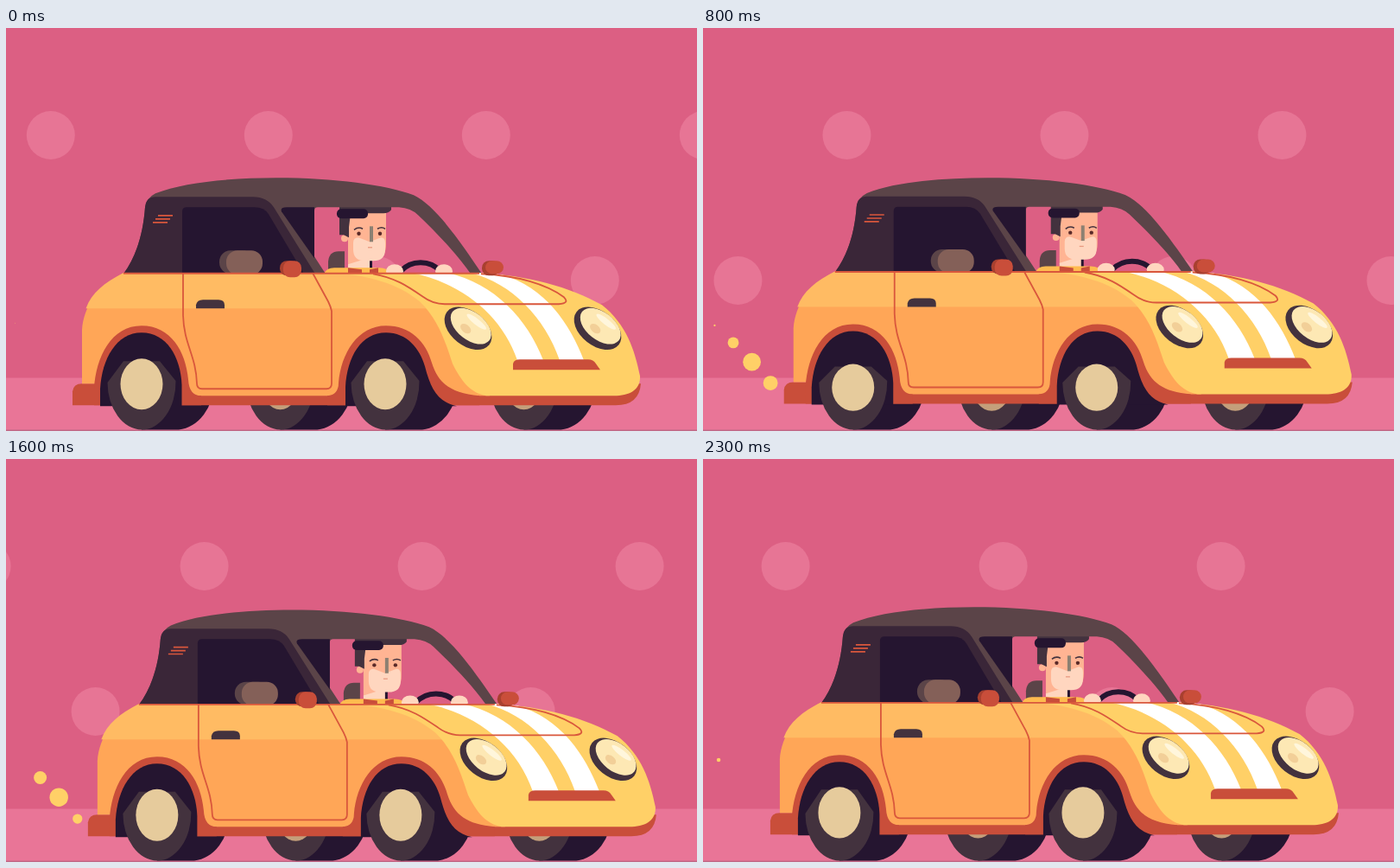
These frames come from a looping animation (800x466 px, 2.35 s). An HTML page:

```html
<!DOCTYPE html>
<html lang="en">
<head>
<meta charset="utf-8">
<title>Drive</title>
<style>
html, body { margin: 0; width: 100%; height: 100%; overflow: hidden; background: #dc5f83; }
svg { display: block; width: 100vw; height: 100vh; }
.red { fill: #c94e3a; }
.navy { fill: #251530; }
.plum { fill: #3a2638; }
.hair { fill: #43323e; }
.roof { fill: #5b4448; }
.skin { fill: #ffb493; }
.pale { fill: #ffd6bf; }
.seam { fill: none; stroke: #d9573c; stroke-width: 1.8; }
</style>
</head>
<body>
<svg viewBox="0 0 800 466">
  <rect width="800" height="466" fill="#dc5f83"/>
  <g id="dots" fill="#e77595"></g>
  <rect y="404.5" width="800" height="62" fill="#e97597"/>
  <rect y="464.5" width="800" height="2" fill="#c06886"/>
  <g id="puffs" fill="#ffd067"></g>

  <g id="car">
    <g id="far"></g>
    <g id="tires"></g>
    <g id="body">
      <g id="cabin">
        <!-- driver -->
        <path class="roof" d="M373 284V270Q374 258 385 258H392V284Z"/>
        <path class="skin" d="M396 210H440V250Q440 268 424 268L396 274Z"/>
        <path class="pale" d="M396 273L412 268H423V280H396Z"/>
        <path class="navy" d="M421 267H424V280H421Z"/>
        <path class="pale" d="M402 248Q402 242 408 242L421 247L434 242Q439 242 439 248V256Q439 269 425 269H416Q402 269 402 256Z"/>
        <circle class="skin" cx="392" cy="243" r="4"/>
        <path class="hair" d="M386 205H446V210Q443 214 437 214H399L397 230V242L391 239H386Z"/>
        <rect class="navy" x="383" y="209" width="36" height="11" rx="5"/>
        <path fill="#8c8072" d="M421 229H425V247H421Z"/>
        <path d="M403 233Q408 229 413 232M430 232Q435 229 439 232" fill="none" stroke="#43323e" stroke-width="1.6"/>
        <circle cx="408.500" cy="237.500" r="2.200" fill="#5a2a28"/>
        <circle cx="433" cy="237.500" r="2.200" fill="#5a2a28"/>
        <path d="M419 253.500H424" stroke="#e89a80" stroke-width="1.300"/>
        <path fill="#ffbb4f" d="M368 284Q371 277 380 277H432Q442 277 446 284Z"/>
        <path class="red" d="M396 277L412 279V284H396ZM421 279L431 277V284H421Z"/>
        <path d="M457 281Q466 271 480 271Q494 271 503 281" fill="none" stroke="#251530" stroke-width="6"/>
        <ellipse class="pale" cx="450" cy="281" rx="10" ry="8"/>
        <ellipse class="pale" cx="507" cy="281" rx="10" ry="8"/>
        <!-- roof with an open front window -->
        <path class="roof" fill-rule="evenodd" d="M136 284C152 262 159 235 161 207Q163 196 173 191C205 178 260 173 313 173C380 173 440 181 472 193C498 205 528 250 551 284Z
          M357 211Q357 207 361 207H455Q469 208 477 216C498 236 523 262 538 284H370L357 264Z"/>
        <path class="plum" d="M136 284C152 262 159 235 161 207Q162 195 173 195H286Q302 195 310 207L358 284Z"/>
        <path class="navy" d="M204 284V212Q204 207 209 207H288Q299 207 304 215L345 284Z"/>
        <path class="navy" d="M319 212Q317 207 325 207H357V266Z"/>
        <rect class="roof" x="247" y="257" width="40" height="27" rx="13"/>
        <rect x="255" y="257" width="42" height="28" rx="13" fill="#846058"/>
        <path d="M176 216.500H193M173 220.500H190M170 224.500H187" stroke="#d9573c" stroke-width="1.700"/>
      </g>

      <path class="red" d="M77 436V420Q78 411 88 411H735Q733 436 706 436Z"/>
      <path fill="#ffa657" d="M88 411V349C90 321 106 299 136 283H560V425H205L104 411Z"/>
      <path fill="#ffbb63" d="M92.500 324C99 306 114 294 136 283H500V324Z"/>
      <path fill="#ffd067" d="M376 283H548C605 286 652 299 690 320C718 342 728 372 734 402C735 418 722 425 704 425H556C538 422 527 408 517 388C509 364 501 337 479 316C454 295 418 285 376 283Z"/>
      <path fill="#fff" d="M470 283C526 294 574 331 592 384H622C604 337 566 295 511 283Z"/>
      <path fill="#fff" d="M538 283C586 295 624 335 641 384H669C653 342 624 299 574 285L550 283Z"/>
      <path class="seam" d="M136 283.500H548"/>
      <path class="seam" d="M425 284C450 288 466 299 482 310Q494 319 508 319H640Q653 318 646 311C626 296 592 286 550 284"/>
      <path class="seam" d="M205 283V332C206 366 220 378 221 411Q221 417 227 417H371Q377 417 377 411V327Q376 322 373 316L355 283"/>
      <path class="hair" d="M220 324V320Q221 314 228 314H246Q253 314 253 320V324Z"/>
      <path class="red" d="M587 395V388Q588 383 595 383H674Q680 383 683 388L688 395Z"/>

      <!-- wheel arches -->
      <path class="red" d="M102 436V417C104 380 122 344 157 344C191 344 208 374 211 406Q212 425 226 425V436Z"/>
      <path class="red" d="M372 436V425Q385 424 385 410C388 376 407 344 440 344C468 344 486 362 493 387C501 412 516 422 548 425V436Z"/>
      <path class="navy" d="M109 437V417C111 382 128 352 157 352C186 352 202 380 203.500 412V437Z"/>
      <path class="navy" d="M393 437V415C395 380 411 352 440 352C464 352 479 370 485 391C492 418 500 432 522 437Z"/>
      <g id="lamps"></g>
      <g id="mirrors"></g>
    </g>
    <g id="wheels"></g>
  </g>
</svg>
<script>
const LOOP = 2350, BUMPS = 6, TURN = 2 * Math.PI;
const $ = id => document.getElementById(id);

function set(el, attrs) {
  for (const k in attrs) el.setAttribute(k, attrs[k]);
  return el;
}

function add(parent, tag, attrs = {}) {
  const el = document.createElementNS("http://www.w3.org/2000/svg", tag);
  return parent.appendChild(set(el, attrs));
}

// Sine ease from 0 to 1 between two times
function ease(t, from, to) {
  const p = Math.min(1, Math.max(0, (t - from) / (to - from)));
  return (1 - Math.cos(Math.PI * p)) / 2;
}

// One slow wave per loop, highest at the given time
const sway = (t, peak) => Math.cos(TURN * (t - peak) / LOOP);

// The road starts gently, then rolls at a constant pace
const LAG = 95;
const road = t => t - LAG * (1 - Math.exp(-t / 150));

for (let k = -1; k < 5; k++) {
  add($("dots"), "circle", { cx: 52 + 252 * k, cy: 124, r: 28 });
  add($("dots"), "circle", { cx: 178 + 252 * k, cy: 292, r: 28 });
}

// The far pair of wheels is darker and sits behind the body
function makeWheel(x, far) {
  add(far ? $("far") : $("tires"), "path", {
    d: `M${x} 356H${x + 43}A45 54.500 0 0 1 ${x + 43} 464.500H${x}Z`, class: "navy"
  });
  const layer = far ? $("far") : $("wheels");
  return {
    x,
    face: add(layer, "path", { class: "hair" }),
    hub: add(layer, "ellipse", { cx: x, rx: far ? 22 : 24.5, fill: far ? "#c49f7b" : "#e6cb9c" })
  };
}
const wheels = [157, 439].flatMap(x => [makeWheel(x + 160.5, true), makeWheel(x, false)]);

for (const x of [535, 685]) {
  const g = add($("lamps"), "g", { transform: `translate(${x} 347) rotate(38)` });
  add(g, "ellipse", { rx: 31, ry: 20, class: "hair" });
  add(g, "ellipse", { cx: 1, cy: -4, rx: 27, ry: 16, fill: "#fde8b4" });
  add(g, "ellipse", { cx: 3, cy: -12, rx: 14, ry: 3.5, fill: "#fff6dc" });
  add(g, "ellipse", { cx: -2, cy: 2, rx: 7, ry: 4.5, fill: "#f2cf98" });
}

for (const x of [317, 551]) {
  add($("mirrors"), "rect", { x, y: 269, width: 20, height: 17, rx: 8, fill: "#a8402f" });
  add($("mirrors"), "rect", { x: x + 4, y: 269, width: 21, height: x < 400 ? 19 : 15, rx: 8, class: "red" });
}

// Two bursts of exhaust per loop
const LIFE = 500;
const puffs = [];
for (const burst of [190, 1300]) {
  for (let i = 0; i < 5; i++) puffs.push({ birth: burst + 140 * i, el: add($("puffs"), "circle") });
}

function drawPuff({ birth, el }, t) {
  const u = (t - birth + LOOP) % LOOP / LIFE;
  set(el, {
    cx: 86 - 77 * u,
    cy: 420 - 94 * u + 14 * u * u,
    r: u < 1 ? 10.8 * Math.sin(Math.PI * u ** 0.55) : 0
  });
}

function drawWheel({ x, face, hub }, cy, ry) {
  const top = cy - ry + 3;
  set(face, {
    d: `M${x - 39.5} 410L${x - 21} ${top}H${x + 21}L${x + 39.5} 408A39.500 55 0 0 1 ${x} 464.500A39.500 55 0 0 1 ${x - 39.5} 410Z`
  });
  set(hub, { cy, ry });
}

function draw(t) {
  const rolled = road(t);
  const bump = Math.cos(TURN * (BUMPS * rolled / (LOOP - LAG) - 1.17));
  const slide = 20.2 * (ease(t, 0, 1100) - ease(t, 1360, 2450));
  const scale = 1 - (1 + sway(t, 1100)) / 110.5;

  set($("dots"), { transform: `translate(${-(0.5514 * rolled % 252)} 0)` });
  set($("car"), { transform: `translate(${slide} 0)` });
  set($("body"), { transform: `translate(0 ${2.4 * bump - 0.9})` });
  set($("cabin"), { transform: `translate(0 ${283.5 * (1 - scale)}) scale(1 ${scale})` });

  const hubY = 412.4 + 4 * sway(t, 800) + 3 * bump;
  const hubR = 28.8 + 1.8 * sway(t, 1900);
  wheels.forEach(w => drawWheel(w, hubY, hubR));
  puffs.forEach(p => drawPuff(p, t));
}

const start = performance.now();
function tick(now) {
  draw(Math.max(0, now - start) % LOOP);
  requestAnimationFrame(tick);
}
draw(0);
requestAnimationFrame(tick);
</script>
</body>
</html>
```
